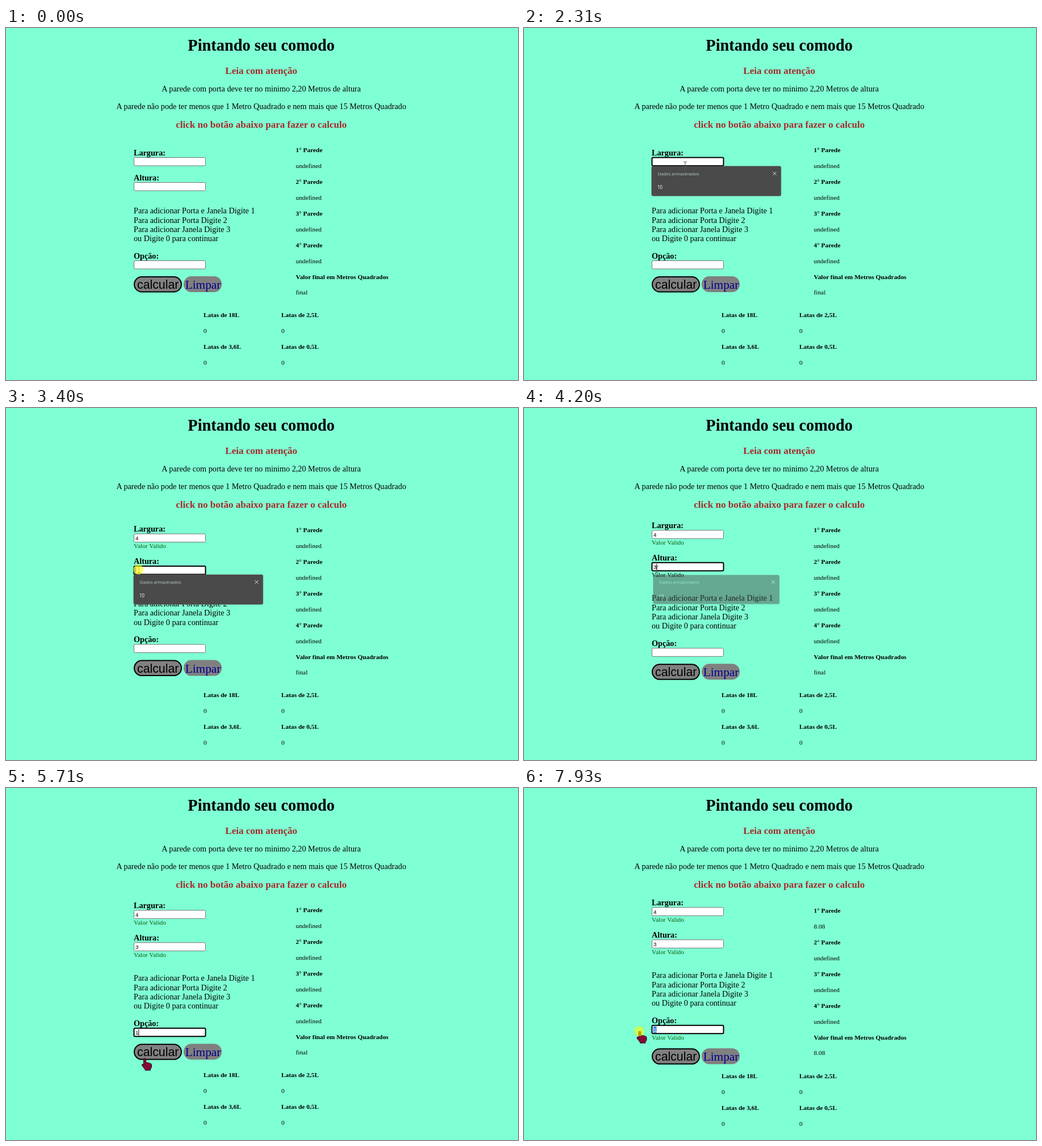
An HTML page that plays this animation: 902 by 621 pixels, repeating every 8 s.

```html
<!DOCTYPE html>
<html lang="pt">
<head>
<meta charset="utf-8">
<title>Pintando seu comodo</title>
<style>
html, body { margin: 0; width: 100%; height: 100%; overflow: hidden; background: #7fffd4; }
svg { display: block; width: 902px; height: 621px; }
text { font: 14.2px "Liberation Serif", "Times New Roman", serif; white-space: pre; }
.mid { text-anchor: middle; }
.h1 { font-size: 28.4px; font-weight: bold; }
.h3 { font-size: 17.04px; font-weight: bold; fill: #a52a2a; }
.b { font-weight: bold; }
.s { font-size: 11.36px; }
.big { font-size: 21.3px; }
.sans { font-family: "Liberation Sans", Arial, sans-serif; }
.val { font-size: 9.8px; }
.ui { font: 7.6px "Open Sans", "Noto Sans", sans-serif; }
</style>
</head>
<body>
<svg id="stage" viewBox="0 0 902 621"></svg>
<script>
const LOOP = 8000, GREEN = '#0a5a0a';
const $ = id => document.getElementById(id);
const text = (x, y, s, cls = '', more = '') => `<text x="${x}" y="${y}" class="${cls}" ${more}>${s}</text>`;

// top edge of each input before any message shows
const fields = [['Largura:', 228.5], ['Altura:', 272.5], ['Opção:', 410.5]];
const help = ['Para adicionar Porta e Janela Digite 1', 'Para adicionar Porta Digite 2',
  'Para adicionar Janela Digite 3', 'ou Digite 0 para continuar'];
const rows = ['1° Parede', '2° Parede', '3° Parede', '4° Parede', 'Valor final em Metros Quadrados'];
const PITCH = 27.9;

const fieldSvg = ([label, y], i) => `<g id="field${i}">
  ${text(225, y - 3.6, label, 'b')}
  <rect id="box${i}" x="225.5" y="${y}" width="126" height="14.5" rx="2" fill="#fff"/>
  <rect id="sel${i}" x="228" y="${y + 2}" width="5.5" height="11" fill="#2f86ea"/>
  ${text(228, y + 11, '', 'sans val', `id="val${i}"`)}
  <rect id="caret${i}" y="${y + 2}" width="1" height="11"/>
  ${text(225, y + 25, 'Valor Valido', 's', `id="msg${i}" fill="${GREEN}"`)}
</g>`;

const can = (x, y, size) => text(x, y, 'Latas de ' + size, 's b') + text(x, y + PITCH, '0', 's');

$('stage').innerHTML =
  text(449.7, 39.8, 'Pintando seu comodo', 'mid h1') +
  text(449.7, 81, 'Leia com atenção', 'mid h3') +
  text(449.7, 112.1, 'A parede com porta deve ter no minimo 2,20 Metros de altura', 'mid') +
  text(449.7, 142.8, 'A parede não pode ter menos que 1 Metro Quadrado e nem mais que 15 Metros Quadrado', 'mid') +
  text(449.7, 175.8, 'click no botão abaixo para fazer o calculo', 'mid h3') +
  fields.map(fieldSvg).join('') +
  `<g id="help">${help.map((s, i) => text(225, 327.2 + 16.3 * i, s)).join('')}</g>
  <g id="buttons">
    <rect x="226" y="439" width="83" height="26.5" rx="13.2" fill="#808080" stroke="#000" stroke-width="2"/>
    <rect x="313" y="438" width="67" height="28" rx="13.5" fill="#808080"/>
    ${text(267.7, 460, 'calcular', 'mid big sans')}
    ${text(347, 460, 'Limpar', 'mid big', 'fill="#00008b"')}
  </g>
  <g id="results">${rows.map((s, i) => text(510.5, 219.3 + 2 * PITCH * i, s, 's b') +
    text(510.5, 219.3 + PITCH * (2 * i + 1), '', 's', `id="res${i}"`)).join('')}</g>
  <g id="cans">${can(348, 509.8, '18L') + can(485, 509.8, '2,5L') +
    can(348, 509.8 + 2 * PITCH, '3,6L') + can(485, 509.8 + 2 * PITCH, '0,5L')}</g>
  <g id="popup">
    <rect x=".3" y=".3" width="228" height="52.5" rx="2.5" fill="#4a4a4a" stroke="#5c5c5c" stroke-width=".6"/>
    ${text(11.2, 16, 'Dados armazenados', 'ui', 'fill="#b4d3c9"')}
    ${text(10.2, 40.6, '10', 'ui', 'fill="#fff" style="font-size:8.2px"')}
    <path d="M214 10.2l6 6m0-6l-6 6" stroke="#e8e8e8" fill="none"/>
  </g>
  <g id="cursor">
    <path id="hand" d="M-2 2Q-2 0 0 0T2 2V7.500Q4 6.500 5.500 8Q7.500 7 8.800 9Q12 8.500 12 11.500V15Q11.500 17.500 9.800 19V21H.500V19.500L-5 12.500Q-5.500 10-3.500 10L-2 11.500Z" fill="#84083a" stroke="#1c0a10"/>
    <path id="beam" d="M-3-6H-1L0-5L1-6H3M-3 6H-1L0 5L1 6H3M0-5V5" fill="none" stroke="#555"/>
    <circle id="press" r="9" cx="-.7" fill="#ff0" fill-opacity=".58"/>
  </g>`;

// pointer keys: time, x, y
const path = [[800, 612, 543], [1230, 232, 345], [1570, 283, 247], [1640, 284, 242], [2640, 284, 242],
  [2710, 267, 259], [2900, 214, 275], [3200, 234, 285], [4200, 234, 285], [4550, 240, 409],
  [4890, 234, 430], [5090, 234, 430], [5600, 244.5, 477], [5900, 244.5, 477], [5960, 249, 472],
  [7180, 249, 472], [7440, 236, 426], [7660, 236, 426], [7930, 204, 429]];
const presses = [[1700, 1800], [3400, 3530], [5020, 5150], [6510, 6650], [7460, LOOP]];
// field, focus start, focus end, last key press
const focus = [[0, 1780, 3400, 2640], [1, 3400, 5020, 4130], [2, 5020, 6510, 5650], [2, 7460, LOOP, 7460]];
// popup top, opening, closing
const popups = [[243.5, 1780, 2640], [293.7, 3400, 4130]];
const typed = [[2640, '4'], [4130, '3'], [5650, '1']];
const shown = [2640, 4130, 5760];
const rise = [0, -6.4, -12.7, -17.7];

function pointer(t) {
  const i = path.findIndex(k => k[0] > t);
  if (i < 0) return path[path.length - 1].slice(1);
  const [t0, x0, y0] = path[i - 1], [t1, x1, y1] = path[i];
  const u = (t - t0) / (t1 - t0), e = u * u * (3 - 2 * u);
  return [x0 + (x1 - x0) * e, y0 + (y1 - y0) * e];
}

const show = (id, on) => $(id).setAttribute('display', on ? 'inline' : 'none');
const move = (id, x, y, more = '') => $(id).setAttribute('transform', `translate(${x} ${y})${more}`);

function draw(t) {
  const count = shown.filter(s => t >= s).length, up = rise[count];
  const drop = n => up + 13 * Math.min(n, count);
  const [px, py] = t < 800 ? [-50, -50] : pointer(t);
  const active = focus.find(f => t >= f[1] && t < f[2]);
  let overInput = false;

  fields.forEach(([, y], i) => {
    const dy = drop(i), on = !!active && active[0] === i;
    const over = px > 225 && px < 352 && py >= y + dy && py <= y + dy + 15;
    const picked = on && t > 7660 && px < 231;
    overInput = overInput || over;
    move('field' + i, 0, dy);
    const box = $('box' + i);
    box.setAttribute('stroke', on ? '#000' : over ? '#4f4f4f' : '#767676');
    box.setAttribute('stroke-width', on ? 2 : 1);
    const value = $('val' + i);
    value.textContent = t >= typed[i][0] ? typed[i][1] : '';
    value.setAttribute('fill', picked ? '#fff' : '#000');
    show('sel' + i, picked);
    const since = on ? t - (t >= active[3] ? active[3] : active[1]) : 0;
    show('caret' + i, on && !picked && Math.floor(since / 530) % 2 === 0);
    $('caret' + i).setAttribute('x', value.textContent ? 233.3 : 228);
    show('msg' + i, t >= shown[i]);
  });
  $('msg1').setAttribute('fill', t < 4800 ? '#000' : GREEN);

  move('help', 0, drop(2));
  move('buttons', 0, drop(3));
  move('results', 0, count > 2 ? 1 : 0);
  move('cans', 0, count > 2 ? 2.6 : 0);
  rows.forEach((_, i) => {
    const last = i === 4;
    $('res' + i).textContent = t >= 6510 && (last || i === 0) ? '8.08' : last ? 'final' : 'undefined';
  });

  const pop = popups.find(p => t >= p[1] && t < p[2] + 135);
  show('popup', !!pop);
  if (pop) {
    const alpha = t < pop[2] ? 1 : 1 - (t - pop[2]) / 135, k = 1 - 0.048 * (1 - alpha);
    $('popup').setAttribute('opacity', alpha);
    move('popup', 224.5 + 114.2 * (1 - k), pop[0] + 26.5 * (1 - k), ` scale(${k})`);
  }

  move('cursor', px, py);
  show('hand', !overInput);
  show('beam', overInput);
  show('press', presses.some(p => t >= p[0] && t < p[1]));
}

const start = performance.now();
function tick() {
  draw((performance.now() - start) % LOOP);
  requestAnimationFrame(tick);
}
tick();
</script>
</body>
</html>
```
